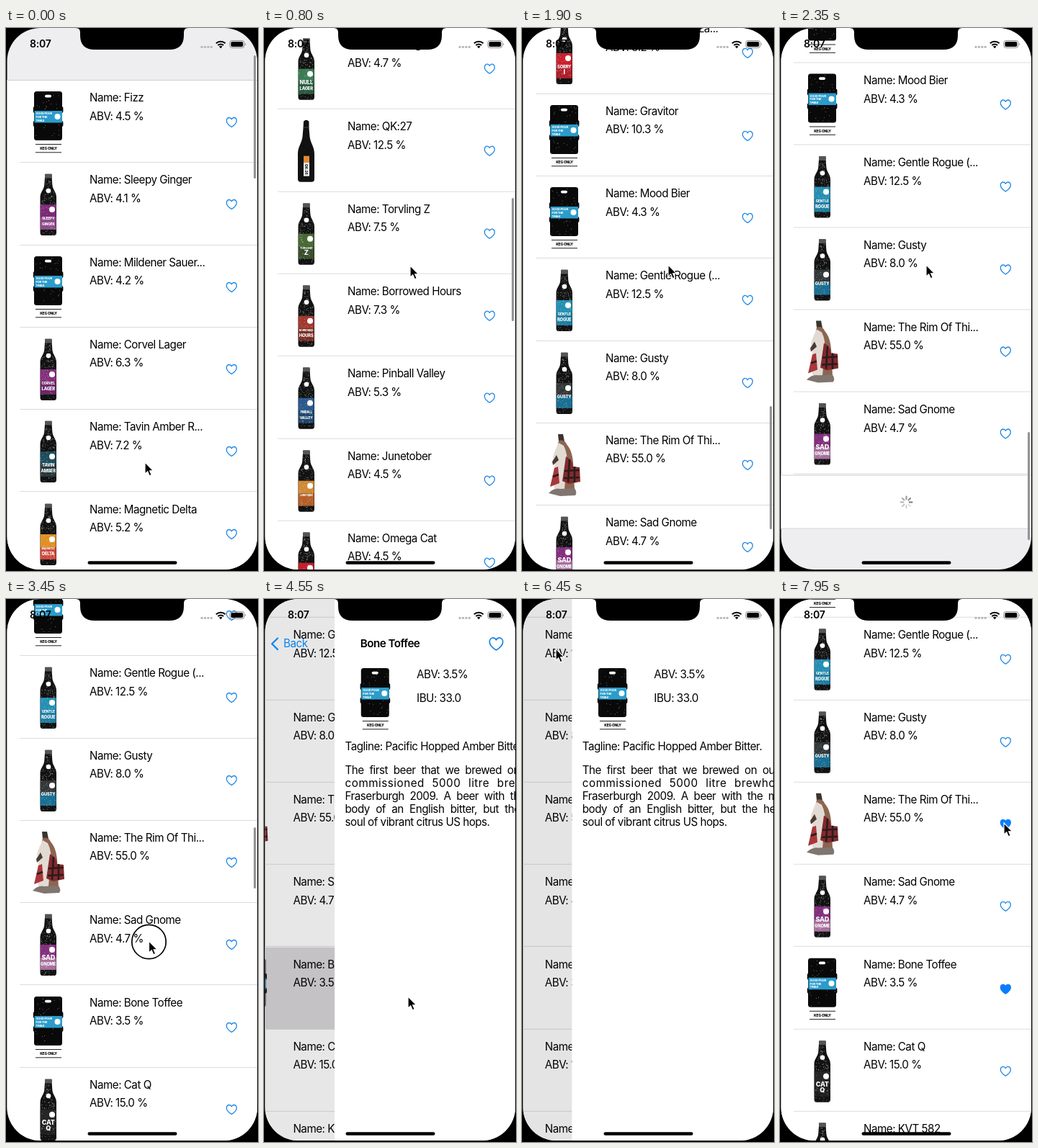
An HTML page for the animation above (8000 ms loop, 350 by 754 pixels).

```html
<!DOCTYPE html>
<html lang="en">
<head>
<meta charset="utf-8">
<title>Beer list</title>
<style>
html, body { margin: 0; width: 100%; height: 100%; overflow: hidden; background: #000; }
body { font: 15.2px/20px Inter, "Liberation Sans", sans-serif; letter-spacing: -.5px; color: #000; }
#stage { position: absolute; left: 0; top: 0; width: 350px; height: 754px; overflow: hidden; }
#stage div, #stage svg { position: absolute; white-space: nowrap; }
svg { overflow: visible; left: 0; top: 0; }
svg text { font-weight: 800; letter-spacing: -.2px; }
#stage .full { left: 0; top: 0; width: 350px; height: 754px; }
#screen { background: #eeeef0; clip-path: inset(0 1px 2px 1.5px round 46px); }
#rows { left: 0; top: 73px; width: 350px; background: #fff; border-top: 1px solid #cfcfd1; margin-top: -1px; }
.row { left: 0; width: 350px; height: 114.3px; }
.row::after { content: ""; position: absolute; left: 19px; right: 0; bottom: 0; height: 1px; background: #dcdcde; }
.name { left: 116px; top: 14px; }
.abv { left: 116px; top: 39.5px; }
.heart { fill: none; stroke: #1b86e6; stroke-width: 1.3; stroke-linejoin: round; }
.heart.on { fill: #0a7cff; stroke: #0a7cff; }
#foot { left: 0; top: 2857.5px; width: 350px; height: 75px; background: #fff; border: solid #cfcfd1; border-width: 1px 0; box-sizing: border-box; }
#thumb { left: 343.5px; width: 3px; border-radius: 2px; background: #949496; }
#dim { background: #000; }
#detail { background: #fff; }
.line { left: 14.5px; width: 320px; text-align: justify; text-align-last: justify; }
#bar { color: #0a84f0; }
#title { left: 0; width: 350px; top: 52px; text-align: center; font-weight: 600; color: #000; }
#time { left: 33px; top: 12px; font-weight: 600; font-size: 14px; letter-spacing: -.2px; }
</style>
</head>
<body>
<div id="stage">
  <div id="screen" class="full">
    <div id="list" class="full">
      <div id="rows"><div id="foot"><svg><g id="spinner" transform="translate(175.5 37)"></g></svg></div></div>
      <div id="thumb"></div>
    </div>
    <div id="dim" class="full"></div>
    <div id="detail" class="full">
      <svg id="photo"></svg>
      <div style="left:114px;top:95px">ABV: 3.5%</div>
      <div style="left:114px;top:128px">IBU: 33.0</div>
      <div style="left:14.5px;top:195px">Tagline: Pacific Hopped Amber Bitter.</div>
    </div>
    <div id="bar" class="full">
      <div id="back" class="full">
        <svg><path d="M19 54.5 11 62.3l8 7.8" fill="none" stroke="#0a84f0" stroke-width="2.2" stroke-linecap="round" stroke-linejoin="round"/></svg>
        <div style="left:27px;top:52px">Back</div>
      </div>
      <div id="title">Bone Toffee</div>
      <svg><g transform="translate(322.5 62.5) scale(1.32)"><path id="fav" class="heart"/></g></svg>
    </div>
    <div id="time">8:07</div>
    <svg>
      <g fill="#b4b4b6"><circle cx="272" cy="26.3" r="1.6"/><circle cx="276.4" cy="26.3" r="1.6"/><circle cx="280.8" cy="26.3" r="1.6"/><circle cx="285.2" cy="26.3" r="1.6"/></g>
      <path d="M291.8 21.2a9.5 9.5 0 0 1 12.8 0M294.3 24a6 6 0 0 1 7.8 0" fill="none" stroke="#000" stroke-width="2.1"/>
      <path d="M298.2 28.3l-2.3-2.5a3.5 3.5 0 0 1 4.6 0z"/>
      <rect x="310.8" y="17.5" width="20" height="10" rx="3" fill="none" stroke="#8a8a8c"/>
      <rect x="312.4" y="19.1" width="16.8" height="6.8" rx="1.7"/>
      <path d="M332.2 20.7q2 1.8 0 3.6z" fill="#8a8a8c"/>
      <path d="M97 0q6 0 6 6v4q0 20 20 20h104q20 0 20-20V6q0-6 6-6z"/>
      <rect x="113.5" y="740.2" width="124" height="4.6" rx="2.3"/>
    </svg>
  </div>
  <svg>
    <g id="cursor">
      <circle id="ring" r="23.7" fill="none" stroke="#000" stroke-width="1.7"/>
      <path d="M0-1V15.2l3.7-3.4 2.6 6 2.9-1.2-2.6-5.8h5z" stroke="#fff" stroke-width="1.2"/>
    </g>
  </svg>
</div>
<script>
const $ = id => document.getElementById(id);
const PITCH = 114.3;
const HEART = 'M0 6.5C-2.5 4.9-7 1.2-7-2.3-7-5.2-5-6.5-3.4-6.5-1.8-6.5-.6-5.6 0-4.2.6-5.6 1.8-6.5 3.4-6.5 5-6.5 7-5.2 7-2.3 7 1.2 2.5 4.9 0 6.5z';

// name | abv | picture | upper label | lower label
const beers = `Fizz|4.5|keg
Sleepy Ginger|4.1|bottle|#7b2a78|#8d4a8a
Mildener Sauer...|4.2|keg
Corvel Lager|6.3|bottle|#84307c|#6d2767
Tavin Amber R...|7.2|bottle|#1d4d5c|#27383e
Magnetic Delta|5.2|bottle|#e09024|#cf4a3c
QK:31|12.8|flask
Null Lager|4.7|bottle|#3a7c56|#2b5c42
QK:27|12.5|flask
Torvling Z|7.5|bottle|#4a6a34|#39502a
Borrowed Hours|7.3|bottle|#a03a30|#7a2c26
Pinball Valley|5.3|bottle|#2c5a8c|#20466e
Junetober|4.5|bottle|#d08a35|#b4602a
Omega Cat|4.5|bottle|#c4202e|#c4202e
Spindle 5|14.5|bottle|#3a3a3a|#2c2c2c
Tumbledry Porter|6.1|bottle|#b8242e|#a02028
QK:26|11.2|flask
Painted Kite –...|6.0|bottle|#777573|#a3282c
Sorry I Was La...|8.2|bottle|#c9222e|#b01f2b
Gravitor|10.3|keg
Mood Bier|4.3|keg
Gentle Rogue (...|12.5|bottle|#2590b4|#1d7ea0
Gusty|8.0|bottle|#33383a|#1b6f92
The Rim Of Thi...|55.0|animal
Sad Gnome|4.7|bottle|#84307f|#a8709f
Bone Toffee|3.5|keg
Cat Q|15.0|bottle|#262626|#202020
KVT 582|9.2|bottle|#303030|#262626`.split('\n').map(line => line.split('|'));

let seed = 7;
const rand = () => (seed = seed * 16807 % 2147483647) / 2147483647;
const rect = (x, y, w, h, fill, rx = 0) =>
  `<rect x="${x}" y="${y}" width="${w}" height="${h}" fill="${fill}" rx="${rx}"/>`;
const word = (x, y, size, text, fill = '#fff', anchor = 'middle') =>
  `<text x="${x}" y="${y}" font-size="${size}" fill="${fill}" text-anchor="${anchor}">${text}</text>`;
const dot = (x, y, r, fill = '#fff') => `<circle cx="${x}" cy="${y}" r="${r}" fill="${fill}"/>`;

function specks(n, x, y, w, h) {
  let d = '';
  while (n--) d += `M${(x + rand() * w).toFixed(1)} ${(y + rand() * h).toFixed(1)}h.8v.8h-.8z`;
  return `<path d="${d}" fill="#ddd" opacity=".7"/>`;
}

const pictures = {
  keg: () => rect(39, 15, 39, 68, '#090909', 3.5) + rect(37.8, 36, 41.6, 9, '#090909', 2) +
    rect(37.8, 56, 41.6, 8, '#090909', 2) + rect(54, 19.7, 9, 3.8, '#fff', 1.9) +
    specks(35, 41, 17, 35, 64) + rect(39.5, 42, 38.5, 16.5, '#2b9ccb') +
    ['GOOD POUR', 'FOR THE', 'TABLE'].map((s, i) => word(41.5, 47 + i * 4.8, 4, s, '#fff', 'start')).join('') +
    dot(71.5, 50, 4) + rect(41, 88, 36, 1, '#222') + word(59, 96.2, 5, 'KEG ONLY', '#000') + rect(41, 99.3, 36, 1, '#222'),

  bottle: (name, top, low) => {
    const words = name.toUpperCase().replace(/[^A-Z0-9 ]/g, '').trim().split(' ').slice(0, 2);
    return '<path d="M54 16h9.600v4l.7 10c.3 8 5.700 10 5.700 18V97q0 4-3 4H50.500q-3 0-3-4V48c0-8 5.500-10 5.800-18l.7-10z" fill="#121212"/>' +
      rect(54, 15.5, 9.6, 6, '#555', 1) + specks(25, 54.5, 22, 7.5, 18) + specks(40, 49, 40, 19, 17) + dot(59, 39, 3.3) +
      rect(47.8, 58, 21.8, 18, top) + rect(47.8, 76, 21.8, 17, low) + specks(45, 48, 58, 20.5, 42) + dot(64, 65, 4) +
      words.map((s, i) => word(58.7, 79 + i * 8, Math.min(9, 29 / s.length), s)).join('');
  },

  flask: () => '<path d="M55 17q3.500-4 7.500 0v9l1 12c1 9 6.500 14 6.500 24v35q0 4-4 4H51q-4 0-4-4V62c0-10 5.500-15 6.500-24l1-12z" fill="#111"/>' +
    rect(54.6, 25, 8, 1, '#444') + rect(55, 65, 8, 9, '#e58a2e') + rect(55, 74, 8, 19, '#f4f4f4') +
    '<g transform="rotate(90 59 83.500)">' + word(59, 85.5, 5, 'QK:26', '#222') + '</g>',

  animal: () => '<path d="M50 15h7l2 10h-8z" fill="#38342f"/>' +
    '<path d="M51 24q8-2 11 5c6 7 8 15 9 25l2 38H47l3-34-3-16z" fill="#8c6551"/>' +
    '<path d="M51 27l7 4q6 12 4 27l-3 33H45q-2-18 0-34l-2-11q4-12 8-19z" fill="#e2dbd4"/>' +
    '<path d="M61 46q9 4 10 14l9 1 1 20-16 3-9-4z" fill="#822a2e"/>' +
    '<path d="M45 62l5-2 2 23-13 5z" fill="#a8363a"/>' +
    '<path d="M59 66l21-1M58 76l22-1M66 50l-2 32M73 60l0 22M43 74l8-3" stroke="#2a1b1c" stroke-width="2.6" fill="none"/>' +
    '<path d="M37 97q8-8 16-6l20-1q4 6 1 10l-21 1z" fill="#80766f"/>' +
    '<path d="M48 44l-6 9 1 5 8-7z" fill="#4b3b33"/>'
};

const heartOf = [];
const rowOf = beers.map(([name, abv, kind, top, low], i) => {
  const row = document.createElement('div');
  row.className = 'row';
  row.style.top = i * PITCH + 'px';
  row.innerHTML = `<svg>${pictures[kind](name, top, low)}<path class="heart" d="${HEART}" transform="translate(313.3 58)"/></svg>
    <div class="name">Name: ${name}</div><div class="abv">ABV: ${abv} %</div>`;
  heartOf.push(row.querySelector('.heart'));
  $('rows').append(row);
  return row;
});

$('photo').innerHTML = `<g transform="translate(-2.300 81)">${pictures.keg()}</g>`;
$('fav').setAttribute('d', HEART);
['The first beer that we brewed on our newly',
 'commissioned 5000 litre brewhouse in',
 'Fraserburgh 2009. A beer with the malt and',
 'body of an English bitter, but the heart and',
 'soul of vibrant citrus US hops.'].forEach((text, i) => {
  const line = document.createElement('div');
  line.className = 'line';
  line.style.top = 227.5 + i * 18 + 'px';
  // short lines also spread their letters when justified
  if (i === 4) line.style.textAlignLast = 'left';
  else line.style.letterSpacing = -.5 + Math.max(0, 42 - text.length) * .17 + 'px';
  line.textContent = text;
  $('detail').append(line);
});
for (let i = 0; i < 8; i++)
  $('spinner').innerHTML += `<path d="M0-4.200V-8" transform="rotate(${i * 45})" stroke="#777" stroke-width="2" stroke-linecap="round"/>`;

const lin = u => u;
const smooth = u => u * u * (3 - 2 * u);
const out = u => 1 - (1 - u) ** 1.5;

// keys: [time, value, easing of the stretch that ends here]
function track(keys, t) {
  const i = keys.findIndex(k => k[0] > t);
  if (i < 0) return keys.at(-1)[1];
  const [t0, a] = keys[i - 1], [t1, b, ease = smooth] = keys[i];
  return a + (b - a) * ease((t - t0) / (t1 - t0));
}

const scrollKeys = [[0, 0], [300, 0], [460, 273, lin], [1380, 1477, out], [1450, 1506, lin], [1650, 1747, lin],
  [1980, 2283, lin], [2120, 2335, out], [2350, 2310.5], [2600, 2283, out], [3300, 2283], [3450, 2394, lin], [3600, 2447.2, out]];
const xKeys = [[0, 193], [300, 193], [460, 203, lin], [900, 203], [1350, 199], [1450, 198.5], [1650, 203, lin],
  [2850, 203], [3200, 198.5], [3800, 198.5], [4100, 200], [5000, 200], [5600, 312], [5850, 312], [6180, 47], [6900, 47], [7600, 311]];
const yKeys = [[0, 604], [300, 604], [460, 331, lin], [900, 331], [1350, 600], [1380, 600], [1450, 571, lin], [1650, 330, lin],
  [2850, 330], [3200, 587], [3300, 587], [3450, 476, lin], [3600, 423, out], [3800, 423], [4100, 553], [5000, 553],
  [5600, 70], [5850, 70], [6180, 70], [6900, 70], [7600, 312]];
const presses = [[300, 470], [1380, 1660], [3300, 3640], [4180, 4290], [5650, 5760], [6230, 6340], [7700, 7800]];

const PUSH = 4355, POP = 6387, LOADED = 2480;
const spring = ms => ms < 0 ? 0 : 1 - (1 + .013 * ms) * Math.exp(-.013 * ms);
const fade = (t, a, b) => Math.min(1, Math.max(0, (t - a) / (b - a)));

function draw(t) {
  const scroll = track(scrollKeys, t), loaded = t >= LOADED;
  $('rows').style.transform = `translateY(${-scroll}px)`;
  $('rows').style.height = (loaded ? 50 : 25) * PITCH + 75 + 'px';
  $('foot').style.display = loaded ? 'none' : '';
  rowOf.forEach((row, i) => {
    row.style.display = i < 25 || loaded ? '' : 'none';
    row.style.background = i === 25 && t > 4230 && t < 5000 ? '#d8d6d8' : '';
  });
  [...$('spinner').children].forEach((spoke, i) =>
    spoke.style.opacity = 1 - .11 * ((Math.floor(t / 125) - i + 32) % 8));

  const top = 38 + scroll * (loaded ? .1165 : .2263);
  $('thumb').style.top = top + 'px';
  $('thumb').style.height = Math.min(loaded ? 85 : 171, 711 - top) + 'px';
  $('thumb').style.opacity = t < 3300 ? 1 - fade(t, 2600, 2800) : 1 - fade(t, 3850, 4050);

  const p = t < POP ? spring(t - PUSH) : 1 - spring(t - POP);
  $('list').style.transform = `translateX(${-105 * p}px)`;
  $('dim').style.opacity = .13 * p;
  $('detail').style.transform = `translateX(${350 * (1 - p)}px)`;
  $('bar').style.opacity = t < POP ? fade(t, 4380, 4530) : 0;
  $('back').style.opacity = t > 6230 ? .3 : 1;

  $('fav').classList.toggle('on', t > 5730);
  heartOf[25].classList.toggle('on', t > 5730);
  heartOf[23].classList.toggle('on', t > 7780);

  $('cursor').setAttribute('transform', `translate(${track(xKeys, t)} ${track(yKeys, t)})`);
  $('ring').style.display = presses.some(([a, b]) => t >= a && t < b) ? '' : 'none';
}

const STEP = 50;
function tick() {
  draw(Math.floor(performance.now() / STEP) * STEP % 8000);
  requestAnimationFrame(tick);
}
tick();
</script>
</body>
</html>
```
